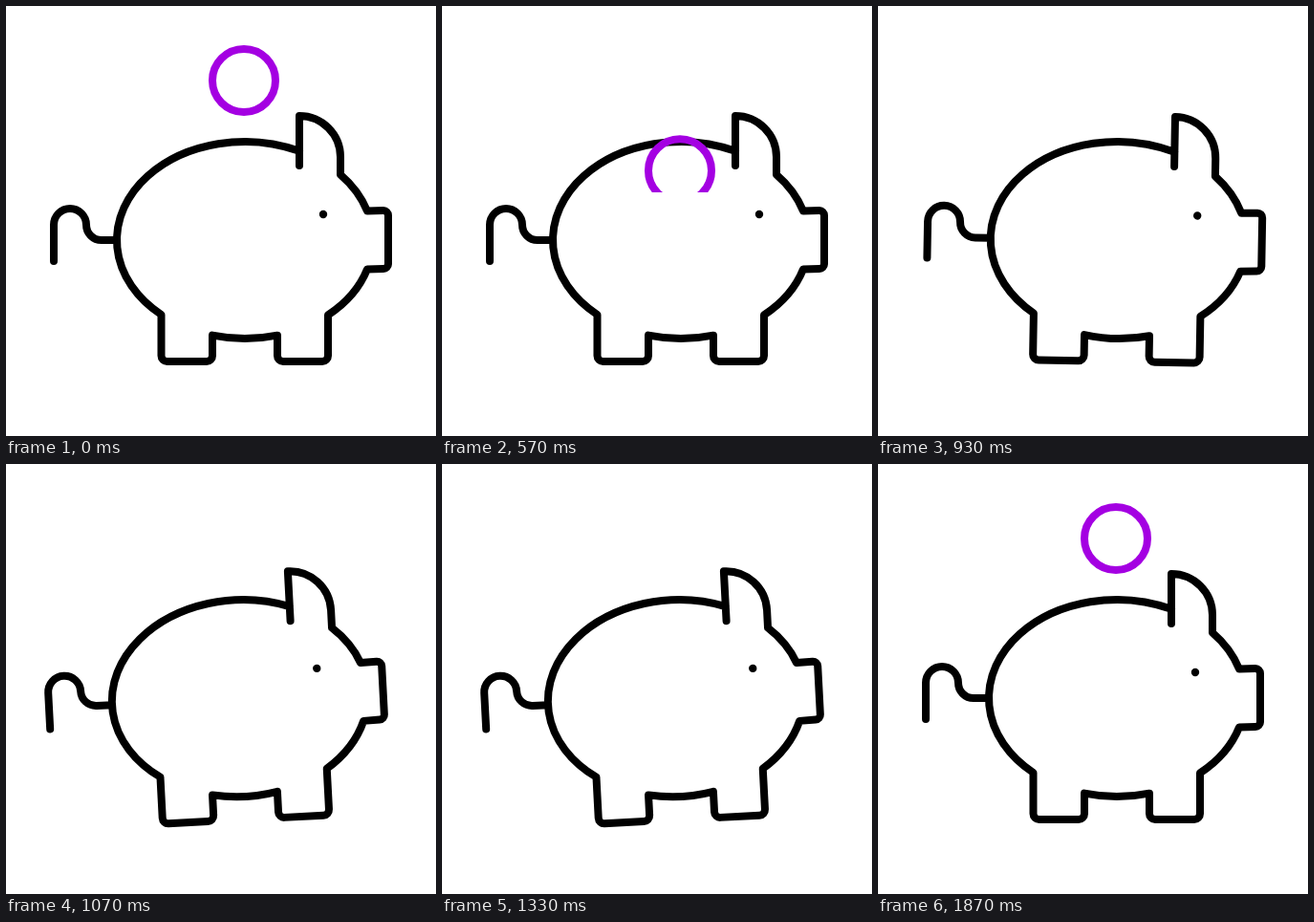
An HTML page with a canvas for the animation above (1.91 s loop, 450 by 450 pixels).

```html
<!DOCTYPE html>
<html lang="en">
<head>
<meta charset="utf-8">
<title>Piggy bank</title>
<style>
  html, body { margin: 0; width: 100%; height: 100%; overflow: hidden; background: #fff; }
  canvas { display: block; width: 450px; height: 450px; }
</style>
</head>
<body>
<canvas id="stage" width="450" height="450"></canvas>
<script>
const ctx = document.getElementById('stage').getContext('2d');
const LOOP = 1910;
const BODY = { x: 250, y: 245, rx: 134, ry: 103 };
const PIVOT = { x: 250, y: 345 };
const COIN = { x: 249, y: 78, r: 33, drop: 157, slot: 195 };

// Keys are [tick, value], with 30 ticks per second.
const TILT = [[21, 0], [26, 5], [31, -5], [36, 5], [41, -5], [46, 0]];
const DROP = [[11, 0], [21, 1]];
const GROW = [[48, 0], [56, 1]];

function track(keys, tick) {
  if (tick <= keys[0][0]) return keys[0][1];
  for (let i = 1; i < keys.length; i++) {
    const [t0, v0] = keys[i - 1], [t1, v1] = keys[i];
    if (tick <= t1) return v0 + (v1 - v0) * (tick - t0) / (t1 - t0);
  }
  return keys[keys.length - 1][1];
}

// Angle on the body outline at x, on its lower half.
const angleAt = x => Math.acos((x - BODY.x) / BODY.rx);

function bodyArc(from, to) {
  ctx.ellipse(BODY.x, BODY.y, BODY.rx, BODY.ry, 0, from, to);
}

function leg(right, left) {
  const foot = 372;
  ctx.arcTo(right, foot, left, foot, 6);
  ctx.arcTo(left, foot, left, 300, 6);
}

function drawPig(degrees) {
  ctx.save();
  ctx.translate(PIVOT.x, PIVOT.y);
  ctx.rotate(degrees * Math.PI / 180);
  ctx.translate(-PIVOT.x, -PIVOT.y);
  ctx.strokeStyle = ctx.fillStyle = '#000';

  ctx.beginPath();
  ctx.moveTo(307, 167);
  ctx.lineTo(307, 115);
  ctx.arc(307, 158, 43, -Math.PI / 2, 0);
  bodyArc(-angleAt(350), -angleAt(378));
  ctx.arcTo(400, 214, 400, 275, 5);
  ctx.arcTo(400, 275, 378, 275, 5);
  bodyArc(angleAt(378), angleAt(337));
  leg(337, 284);
  bodyArc(angleAt(284), angleAt(216));
  leg(216, 162.5);
  bodyArc(angleAt(162.5), 2 * Math.PI - angleAt(307));

  ctx.moveTo(50, 267);
  ctx.lineTo(50, 229);
  ctx.arc(67, 229, 17, Math.PI, 0);
  ctx.arc(100, 229, 16, Math.PI, Math.PI / 2, true);
  ctx.lineTo(116, 245);
  ctx.stroke();

  ctx.beginPath();
  ctx.arc(332, 218, 4.2, 0, 2 * Math.PI);
  ctx.fill();
  ctx.restore();
}

function drawCoin(y, scale) {
  if (scale <= 0) return;
  ctx.save();
  ctx.beginPath();
  ctx.rect(0, 0, 450, COIN.slot);
  ctx.clip();
  ctx.translate(COIN.x, y);
  ctx.scale(scale, scale);
  ctx.strokeStyle = '#a400e2';
  ctx.beginPath();
  ctx.arc(0, 0, COIN.r, 0, 2 * Math.PI);
  ctx.stroke();
  ctx.restore();
}

function draw(ms) {
  const tick = Math.min(56, Math.floor((Math.floor(ms / 10) + 0.5) * 0.3));
  ctx.fillStyle = '#fff';
  ctx.fillRect(0, 0, 450, 450);
  ctx.lineWidth = 8;
  ctx.lineCap = ctx.lineJoin = 'round';
  drawPig(track(TILT, tick));
  if (tick < 21) drawCoin(COIN.y + COIN.drop * track(DROP, tick), 1);
  else drawCoin(COIN.y, track(GROW, tick));
}

const start = performance.now();
function loop() {
  draw((performance.now() - start) % LOOP);
  requestAnimationFrame(loop);
}
loop();
</script>
</body>
</html>
```
